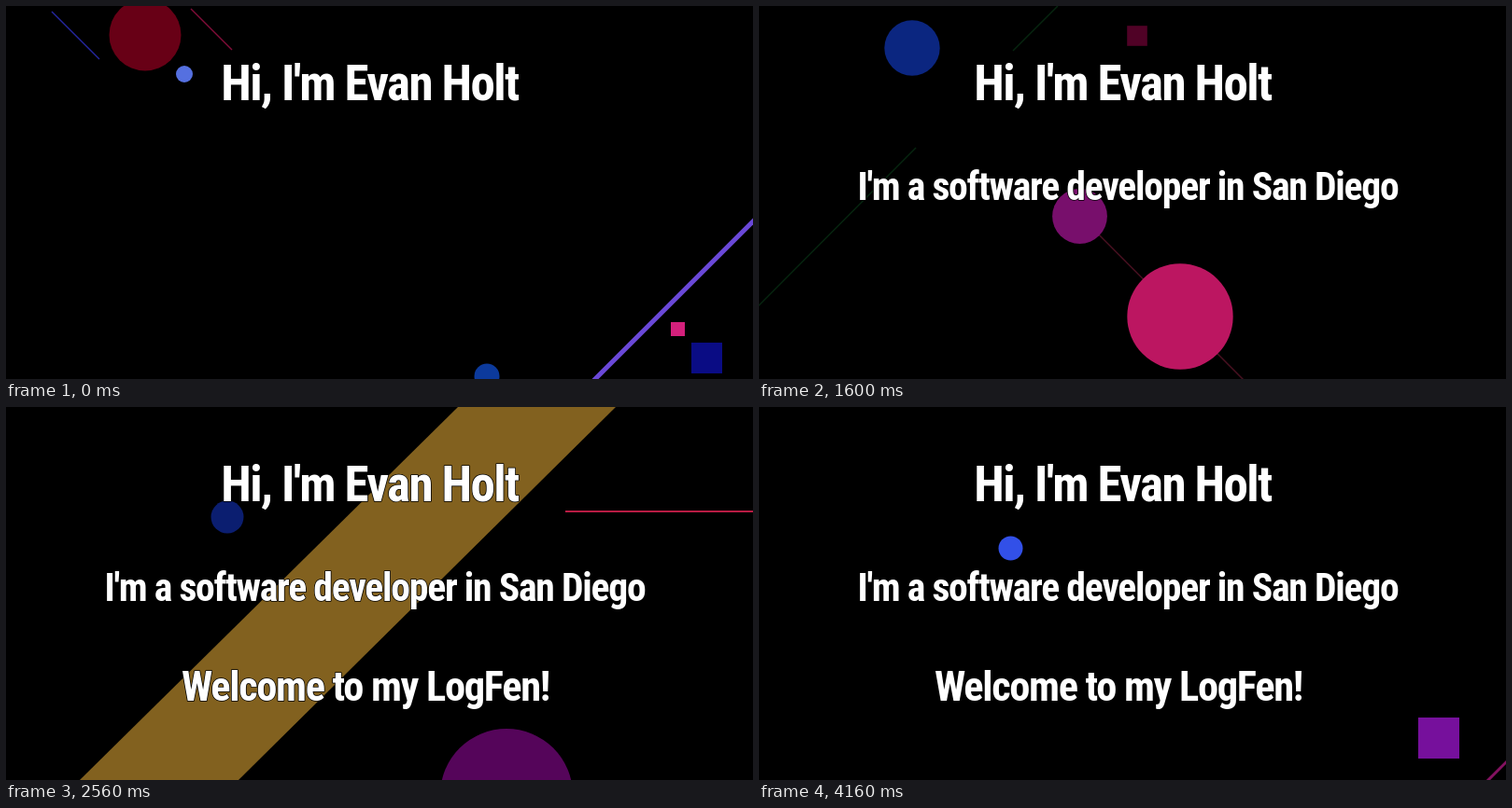
Animation of 800x400 px, one loop 4480 ms. Source, as an HTML page with a canvas:

```html
<!DOCTYPE html>
<html lang="en">
<head>
<meta charset="utf-8">
<title>Welcome</title>
<style>
html, body { margin: 0; width: 100%; height: 100%; overflow: hidden; background: #000; }
canvas { display: block; }
</style>
</head>
<body>
<canvas id="stage" width="800" height="400"></canvas>
<script>
const ctx = document.getElementById('stage').getContext('2d');
const STEP = 320, STEPS = 14;
const shapes = [];

// Each shape peaks at one step; it may enter small before and linger faded after.
const add = (at, draw, pre = 0, post = 0) => shapes.push({ at, draw, pre, post });

const circle = (at, color, x, y, r, pre = 1) => add(at, size => {
  ctx.fillStyle = color;
  ctx.beginPath();
  ctx.arc(x, y, r * size, 0, 2 * Math.PI);
  ctx.fill();
}, pre);

const square = (at, color, x, y, side, pre = 1) => add(at, size => {
  const inset = side * (1 - size) / 2;
  ctx.fillStyle = color;
  ctx.fillRect(x + inset, y + inset, side * size, side * size);
}, pre);

const band = (at, color, points, pre = 0, post = 0) => add(at, () => {
  ctx.fillStyle = color;
  ctx.beginPath();
  points.forEach(p => ctx.lineTo(...p));
  ctx.fill();
}, pre, post);

const line = (at, color, width, x1, y1, x2, y2, post = 1, dash = []) => add(at, () => {
  ctx.strokeStyle = color;
  ctx.lineWidth = width;
  ctx.setLineDash(dash);
  ctx.beginPath();
  ctx.moveTo(x1, y1);
  ctx.lineTo(x2, y2);
  ctx.stroke();
  ctx.setLineDash([]);
}, 0, post);

circle(0, '#680016', 149, 31, 38.5);
circle(0, '#5570e0', 191, 73, 9);
circle(0, '#0c3a9c', 515, 397, 13.5);
line(0, '#2527a0', 1.5, 49, 6, 100, 57);
line(0, '#800d38', 1.5, 198, 3, 242, 47);
line(0, '#6a48d8', 5, 629, 402, 803, 228);
square(0, '#d4207c', 712, 339, 15);
square(0, '#0a0c84', 734, 361, 33);

circle(2, '#6f2278', 163, 45, 59);
circle(2, 'rgba(227,33,102,.64)', 98.5, -21, 77);
circle(2, '#80164a', 323, 205, 83.5);
circle(2, '#03126a', 429, 311, 37.5);
line(2, '#7c1155', 3, 265, 401, 669, -1);
line(2, '#1c35a8', 1.5, 385, 343, 443, 401);
line(2, '#6a4a08', 1.5, 550, 352, 598, 401);
square(2, '#1424b4', 659, 286, 25);
square(2, '#3a66dc', 724, 351, 43);

circle(4, '#34000f', 27, -90, 121);
circle(4, '#38108c', 353, 234, 110);
circle(4, 'rgba(229,29,71,.7)', 266, 148, 89);
square(4, '#44054a', 430, 57, 82);
square(4, '#33001d', 582, 209, 185);
line(4, '#0d4a1e', 1.5, 320, 0, 272, 48);
line(4, '#0d4a1e', 1.5, 168, 152, -1, 322);
line(4, '#8e2040', 1.5, 333, 214, 519, 401);
band(4, 'rgba(64,4,148,.5)', [[714, 400], [800, 312], [800, 400]]);

circle(6, '#0b2680', 164, 45, 49.5);
circle(6, '#780f6c', 343.5, 225.5, 49);
circle(6, '#bc1661', 451, 333, 94.5);
square(6, '#500226', 387, 14, 36);
line(6, '#b0b4d0', 1.5, 118, 0, 333, 215, 1, [17, 12]);
line(6, '#c018a0', 2, 162, 205, 162, 400);
band(6, 'rgba(4,29,102,.52)', [[432, 400], [800, 37], [800, 175], [573, 400]], 0, 1);
band(6, '#3c0010', [[629, 400], [800, 235], [800, 400]], 0, 1);

band(8, '#82611f', [[79, 400], [484, 0], [653, 0], [249, 400]], 1);
circle(8, '#0b1e70', 237, 118, 17.5);
circle(8, '#55055a', 536, 416, 71);
line(8, '#b81c44', 2, 599, 112, 800, 112);

band(11, '#1c3003', [[0, 62], [67, 0], [108, 0], [0, 100]], 2);
square(11, '#1d0240', 497, 124, 209);
circle(11, '#100b5a', 401.5, 284, 36);
circle(11, '#de18b4', 374.5, 256, 9);
line(11, '#1c48c8', 1.5, 768, 315, 768, 396, 0);
line(11, '#1c48c8', 1.5, 648, 395.5, 769, 395.5, 0);

circle(13, '#3250e8', 269.5, 151.5, 13);
square(13, '#76109c', 706, 333, 44);
line(13, '#841260', 3, 779, 402, 802, 379, 0);

const lines = [
  { from: 0, text: "Hi, I'm Evan Holt", x: 389.5, y: 82, size: 53, room: 327 },
  { from: 3, text: "I'm a software developer in San Diego", x: 395, y: 193, size: 42, room: 579 },
  { from: 6, text: 'Welcome to my LogFen!', x: 385, y: 299, size: 47, room: 394 }
];

function setFont(size) {
  ctx.font = `800 ${size}px Impact, "Roboto Condensed", "Open Sans", sans-serif`;
  ctx.letterSpacing = `${-0.03 * size}px`;
}

// The type size shrinks until the line fits its room.
function drawText({ text, x, y, size, room }) {
  setFont(size);
  const fit = size * Math.min(1, room / ctx.measureText(text).width);
  setFont(fit);
  const base = y + 0.36 * fit;
  ctx.textAlign = 'center';
  ctx.lineJoin = 'round';
  ctx.strokeStyle = '#000';
  ctx.lineWidth = 1.5;
  ctx.strokeText(text, x, base);
  ctx.fillStyle = '#fff';
  ctx.fillText(text, x, base);
}

function frame(now) {
  const step = Math.floor(now / STEP) % STEPS;
  ctx.fillStyle = '#000';
  ctx.fillRect(0, 0, 800, 400);
  for (const { at, draw, pre, post } of shapes) {
    if (step < at - pre || step > at + post) continue;
    ctx.globalAlpha = step > at ? 0.5 : 1;
    draw(step < at ? 0.6 : 1);
  }
  ctx.globalAlpha = 1;
  lines.filter(l => step >= l.from).forEach(drawText);
  requestAnimationFrame(frame);
}
requestAnimationFrame(frame);
</script>
</body>
</html>
```
